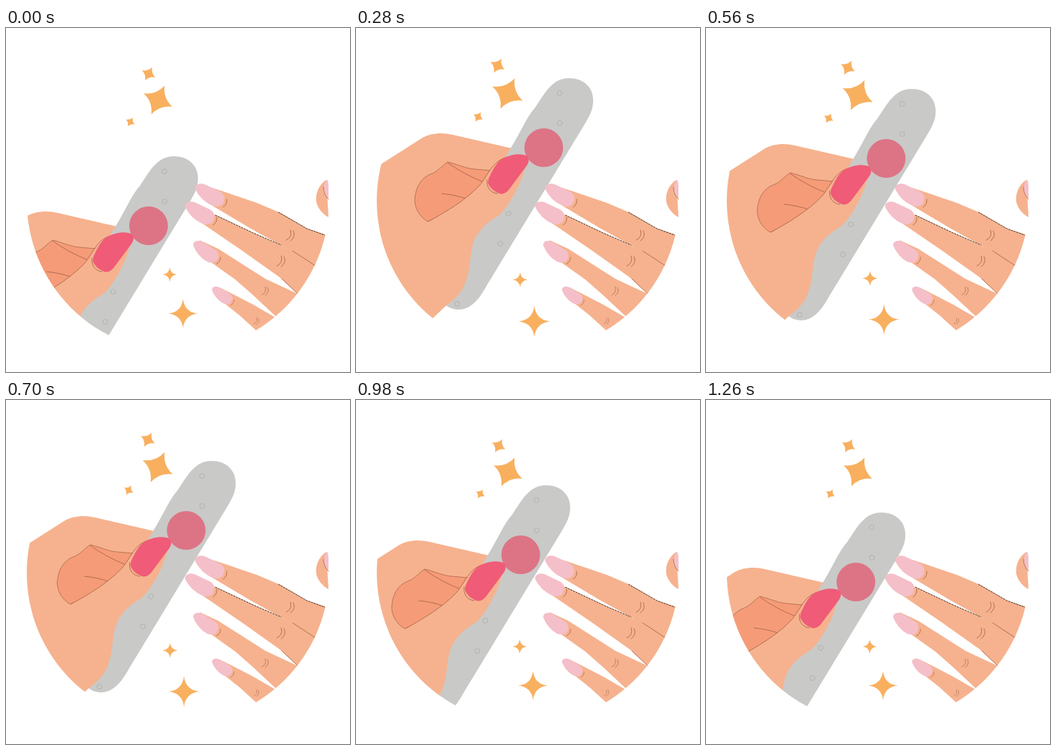
These frames come from a looping animation (480 by 480 pixels, 1400 ms). An HTML page:

```html
<!DOCTYPE html>
<html lang="en">
<head>
<meta charset="utf-8">
<title>Nail filing</title>
<style>
html, body { margin: 0; width: 100%; height: 100%; overflow: hidden; background: #fff; }
svg { display: block; width: 100%; height: 100%; }
.skin { fill: #f6b28e; }
.palm { fill: #f69b78; stroke: #a8694a; stroke-width: .8; }
.polish { fill: #f05b78; }
.pink { fill: #f4bfc9; }
.line { fill: none; stroke: #a8694a; stroke-width: .9; stroke-linecap: round; }
.edge { fill: none; stroke: #4a3024; stroke-dasharray: 3 1; }
.board { fill: #c9c9c7; }
#bumps { fill: none; stroke: #b1b1af; }
#sparkles { fill: #f8b05f; }
</style>
</head>
<body>
<svg viewBox="0 0 480 480">
  <defs>
    <clipPath id="round"><circle cx="240" cy="241" r="211"/></clipPath>
    <g id="nail">
      <path class="pink" d="M0 8C-1 1 7 -1 13 1L34 11C41 14 42 21 39 27C37 32 29 33 24 31Q8 24 0 8Z"/>
      <path class="line" d="M39 33Q45 29 44 22"/>
    </g>
    <path id="knuckle" class="line" d="M0 13Q9 9 6 -1M6 14Q14 8 10 0"/>
    <path id="gem" d="M0 -10Q2.4 -2.4 10 0Q2.4 2.4 0 10Q-2.4 2.4 -10 0Q-2.4 -2.4 0 -10Z"/>
    <path id="star" d="M0 -10Q1 -1 10 0Q1 1 0 10Q-1 1 -10 0Q-1 -1 0 -10Z"/>
  </defs>

  <g clip-path="url(#round)">
    <g id="filing">
      <path class="skin" d="M-20 225L93 153C103 147 120 145 135 149L222 169L200 300L60 450L-60 450Z"/>
      <path class="palm" d="M100 270C88 263 82 251 82 240C83 222 91 209 104 204C114 201 120 192 128 187C142 190 152 196 166 197L200 200L180 235Z"/>
      <path class="line" d="M128 188Q150 204 178 215M120 231Q140 233 156 239"/>
      <path class="board" d="M297 70C318 70 331 83 331 101C331 115 325 124 318 136L182 360C170 382 158 393 143 393C135 393 127 389 122 384L130 320L215 169C229 147 238 124 250 111C264 90 274 70 297 70Z"/>
      <g id="bumps"></g>
      <circle cx="262" cy="167" r="27" fill="#dc7485"/>
      <path class="skin" d="M101 270C126 256 152 241 172 220C184 207 191 186 213 179L238 182C237 197 229 217 222 230C214 244 206 257 197 263C181 272 168 286 164 299C158 317 160 335 154 351C150 366 140 377 125 388L60 450L-60 450L-60 300Z"/>
      <path class="line" d="M101 270C126 256 152 241 172 220C184 207 190 183 213 180M183 212C182 222 187 230 197 231"/>
      <path class="polish" d="M185 210C190 200 194 190 202 184C212 177 226 175 234 177C241 178 243 184 239 191L213 226C208 232 202 233 196 229C190 226 186 221 184 216Z"/>
    </g>

    <g class="skin">
      <path d="M272 218L300 227L350 244L383 258L420 280L460 293V350L394 309L340 279L288 248Z"/>
      <path d="M258 243L292 261L345 286L400 311L460 345V400L407 371L382 348L330 311L270 270Z"/>
      <path d="M270 296L296 308L362 350L407 371L440 390L390 420L376 402L345 373L320 351L282 324Z"/>
      <path d="M298 362L316 371L345 386L376 404L400 418L360 440L349 422L326 401L302 382Z"/>
      <path d="M447 212C437 218 431 231 433 243C436 254 444 261 450 264Z"/>
    </g>
    <path class="edge" d="M292 261L345 286L384 303M380 257L420 280L445 289"/>
    <path class="line" d="M400 311L432 332M385 350L407 371M443 222Q443 232 450 239"/>
    <path class="pink" d="M447 212L450 213V238C444 232 441 222 447 212Z"/>

    <use href="#nail" transform="translate(264 217)"/>
    <use href="#nail" transform="translate(250 242)"/>
    <use href="#nail" transform="translate(262 296) rotate(6) scale(.9)"/>
    <use href="#nail" transform="translate(288 360) rotate(6) scale(.73)"/>
    <use href="#knuckle" transform="translate(391 283)"/>
    <use href="#knuckle" transform="translate(378 319)"/>
    <use href="#knuckle" transform="translate(357 362) scale(.8)"/>
    <use href="#knuckle" transform="translate(346 405) scale(.6)"/>
  </g>

  <g id="sparkles">
    <use href="#gem" transform="translate(212 100.5) rotate(25) scale(2.2)"/>
    <use href="#gem" transform="translate(199 64) rotate(28) scale(1.05)"/>
    <use href="#gem" transform="translate(173.5 131) rotate(30) scale(.7)"/>
    <use href="#star" transform="translate(228.5 344)"/>
    <use href="#star" transform="translate(247 398.5) scale(2.05)"/>
  </g>
</svg>
<script>
(() => {
  const STEP = 140, STEPS = 10;
  // drop of the hand below its highest place; the second half of the loop mirrors the first
  const drops = [109, 87, 0, 49, 15, 15];
  const byId = id => document.getElementById(id);

  // bumps wander from side to side down the board
  for (let i = 0; i < 8; i++) {
    const x = 300 - 22.4 * i - 16 * Math.cos(2 * i), y = 91 + 42 * i;
    byId("bumps").innerHTML += `<circle cx="${x}" cy="${y}" r="3.4"/>`;
  }

  function draw(time) {
    const step = Math.floor(time / STEP) % STEPS;
    const drop = drops[Math.min(step, STEPS - step)];
    const side = -drop * (0.72 - 0.0013 * drop);
    byId("filing").setAttribute("transform", `translate(${side} ${drop})`);

    // sparkles spread out from the middle as the hand nears the top
    const spread = 1 + 0.067 * Math.max(0, 1 - (drop / 30) ** 2);
    byId("sparkles").setAttribute("transform",
      `translate(220 235) scale(${spread}) translate(-220 -235)`);
  }

  const start = performance.now();
  function tick() {
    draw(performance.now() - start);
    requestAnimationFrame(tick);
  }
  tick();
})();
</script>
</body>
</html>
```
